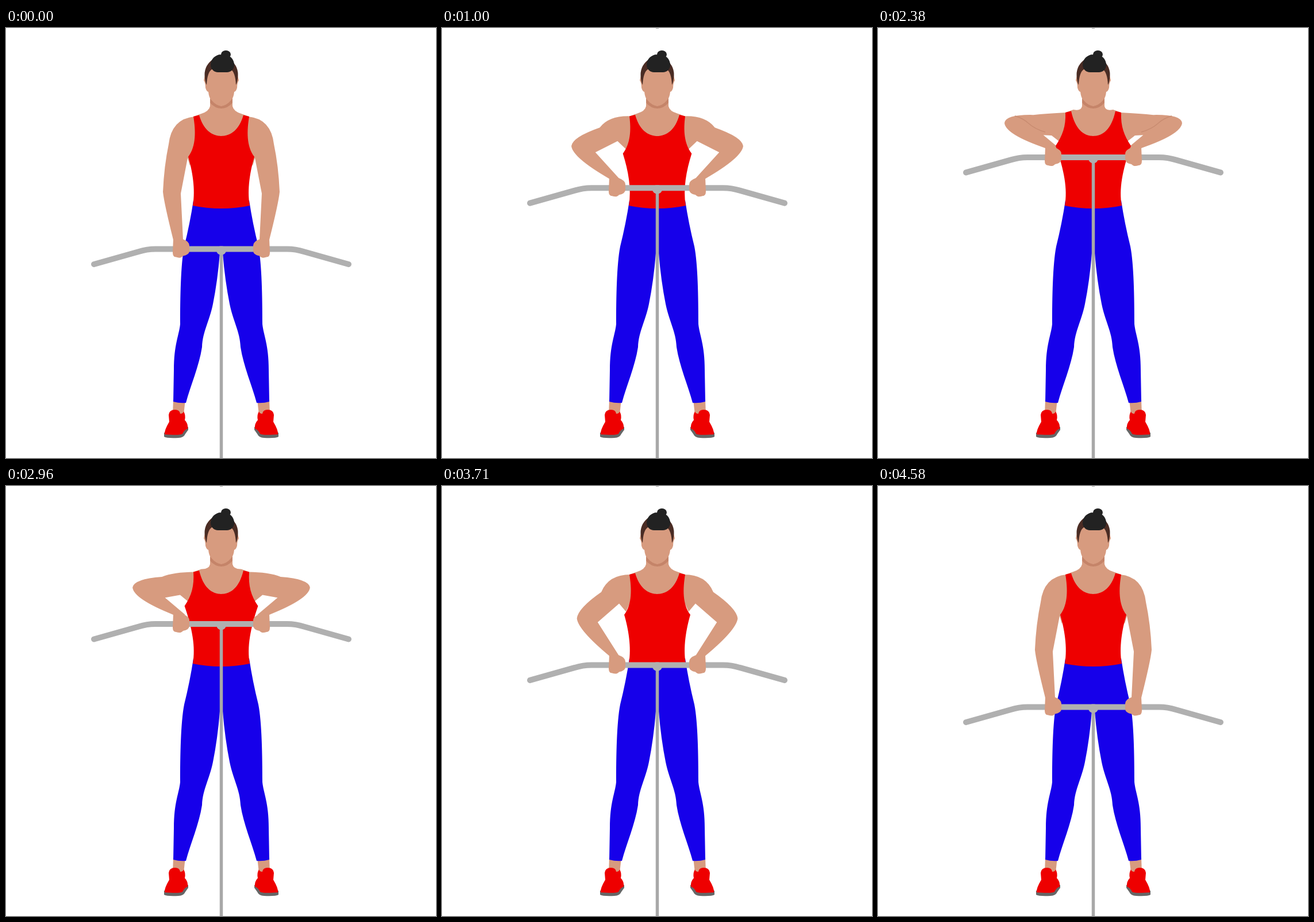
Write an HTML page with a canvas that moves like this. It is 748 px wide and 748 px high and loops after 4.62 s.

```html
<!DOCTYPE html>
<html lang="en">
<head>
<meta charset="utf-8">
<title>Upright cable row</title>
<style>
  html, body { margin: 0; width: 100%; height: 100%; overflow: hidden; background: #fff; }
  canvas { display: block; }
</style>
</head>
<body>
<canvas id="stage" width="748" height="748"></canvas>
<script>
const ctx = document.getElementById('stage').getContext('2d');
const LOOP = 4620, FPS = 24, CENTRE = 374.5;
const LOW = 384.5, TRAVEL = 160;
const SKIN = '#d79b7f', RED = '#ee0000', BLUE = '#1600ea', STEEL = '#b0b0b0', CABLE = '#a8a8a8';

// Left halves; bothSides() adds the mirrored right halves
const pants = `M376 300 H326 Q320 340 310 380 C304 410 303 470 303 515 C301 535 292 550 292 595 L291 650
  Q302 653 313 652 C321 622 336 588 341 555 C342 528 354 510 360 480 Q368 440 372 392 H376 Z`;
const ankle = 'M291 646 H312 L309 673 H290 Z';
const sole = 'M275 704 V711 Q280 714 300 713 Q309 713 312 706 L317 699 V694 Z';
const shoe = `M283 673 Q284 664 294 664 Q302 664 303 671 Q308 671 309 667 Q313 674 311 682
  Q317 688 316 697 Q310 699 307 706 Q303 709 276 707 Q275 700 284 685 Z`;
const hand = 'M291 -18 L308 -17 Q319 -13 319 -6 V3 Q319 10 308 12 Q304 17 296 14 Q290 14 290 6 Z';
const face = 'M376 66 H350 L344 91 Q347 96 347 104 Q349 111 352 111 Q353 121 357 125 Q366 136 376 136 Z';
const neckShadow = 'M376 118 H355 V130 Q363 140 376 140 Z';
const sideHair = 'M362 53 Q345 64 345.5 82 Q346 94 349 99 Q350 77 358 72 H364 Z';

const clamp = v => Math.min(1, Math.max(0, v));

function fill(path, colour) {
  ctx.fillStyle = colour;
  ctx.fill(new Path2D(path));
}

function line(path, colour, width) {
  ctx.strokeStyle = colour;
  ctx.lineWidth = width;
  ctx.stroke(new Path2D(path));
}

function bothSides(draw) {
  draw();
  ctx.save();
  ctx.translate(2 * CENTRE, 0);
  ctx.scale(-1, 1);
  draw();
  ctx.restore();
}

// Cosine ease whose exponent shifts its midpoint
function ease(t, start, end, power) {
  const phase = clamp((t - start) / (end - start)) ** power;
  return (1 - Math.cos(Math.PI * phase)) / 2;
}

const liftAt = t => ease(t, 167, 1580, 0.945) - ease(t, 2150, 4560, 1.467);

// The joints follow smooth curves of the lift, which runs from 0 (low) to 1 (high)
function armPath(lift, bar, strap) {
  const l2 = lift * lift, l6 = lift ** 6;
  const shoulder = [283 - 13 * lift, 202 - 28 * lift - 23 * l2];
  const elbowX = 273 - 110 * lift + 57 * l2, elbowY = 285 - 120 * lift;
  const crook = [304 - 105 * lift + 70 * l2 + 19 * l6, 288 - 120 * lift + 18 * l2];
  const armpit = [316 - 20 * lift + 6 * l2, 226 - 54 * lift + 15 * l2];
  const straighten = 30 * (1 - lift) ** 4;
  const wrist = bar - 16;
  return `M334 188 L328 ${strap} Q${288 + 4 * lift} ${158 - 9 * lift} ${shoulder}
    Q${elbowX + 2} ${elbowY - 15 - straighten} ${elbowX} ${elbowY}
    Q${elbowX + 2} ${elbowY + 20} 291 ${wrist}
    L${308 + 7 * l6} ${wrist} L${crook} L${armpit} L320 ${armpit[1] + 14} Z`;
}

function drawBody(lift, bar) {
  const raise = clamp((300 - bar) / 75);
  const strap = 154 - 7 * raise * raise;
  const pitX = 317 - 8 * raise, pitY = 224 - 19 * raise;
  const arm = armPath(lift, bar, strap);
  const chest = `M376 118 H355 V136 Q353 145 340 ${strap - 5} L326 ${strap} L330 200 H376 Z`;
  const vest = `M326 ${strap} C${330 - 3 * raise} ${strap + 24} ${331 - 10 * raise} ${pitY - 18} ${pitX} ${pitY}
    C324 248 330 280 325 309 Q348 314 376 314 V188 C357 188 343 176 336 ${strap - 2.5} Z`;
  bothSides(() => {
    for (const [path, colour] of [[ankle, SKIN], [sole, '#666'], [shoe, RED], [pants, BLUE], [chest, SKIN], [arm, SKIN]])
      fill(path, colour);
    ctx.globalAlpha = clamp((236 - bar) / 8);
    line('M238 153 Q251 156 262 166 T291 181', '#c88b70', 1.4);
    ctx.globalAlpha = 1;
    fill(vest, RED);
  });
}

function drawHead() {
  bothSides(() => fill(neckShadow, '#c58469'));
  bothSides(() => fill(face, SKIN));
  bothSides(() => fill(sideHair, '#4a2c24'));
  ctx.fillStyle = '#222';
  ctx.beginPath();
  ctx.roundRect(356, 46, 41, 31, [20, 20, 14, 14]);
  ctx.ellipse(382.5, 46, 8.5, 7, 0, 0, 2 * Math.PI);
  ctx.fill();
}

function drawBar(bar) {
  ctx.save();
  ctx.translate(0, bar);
  ctx.lineCap = 'round';
  line(`M${CENTRE} 4 V600`, CABLE, 5.5);
  bothSides(() => line('M153 26.5 L231 4.5 Q245 0 260 0 H376', STEEL, 10));
  fill('M366 0 V2 A8.5 8.5 0 0 0 383 2 V0 Z', STEEL);
  bothSides(() => fill(hand, SKIN));
  ctx.restore();
}

function draw(t) {
  const lift = liftAt(Math.floor(t * FPS / 1000) * 1000 / FPS);
  const bar = LOW - TRAVEL * lift;
  ctx.fillStyle = '#fff';
  ctx.fillRect(0, 0, 748, 748);
  drawBody(lift, bar);
  drawHead();
  drawBar(bar);
  if (t >= 170) {
    ctx.fillStyle = CABLE;
    ctx.fillRect(372, 0, 5, 1);
  }
}

const start = performance.now();
function tick() {
  draw((performance.now() - start) % LOOP);
  requestAnimationFrame(tick);
}
tick();
</script>
</body>
</html>
```
